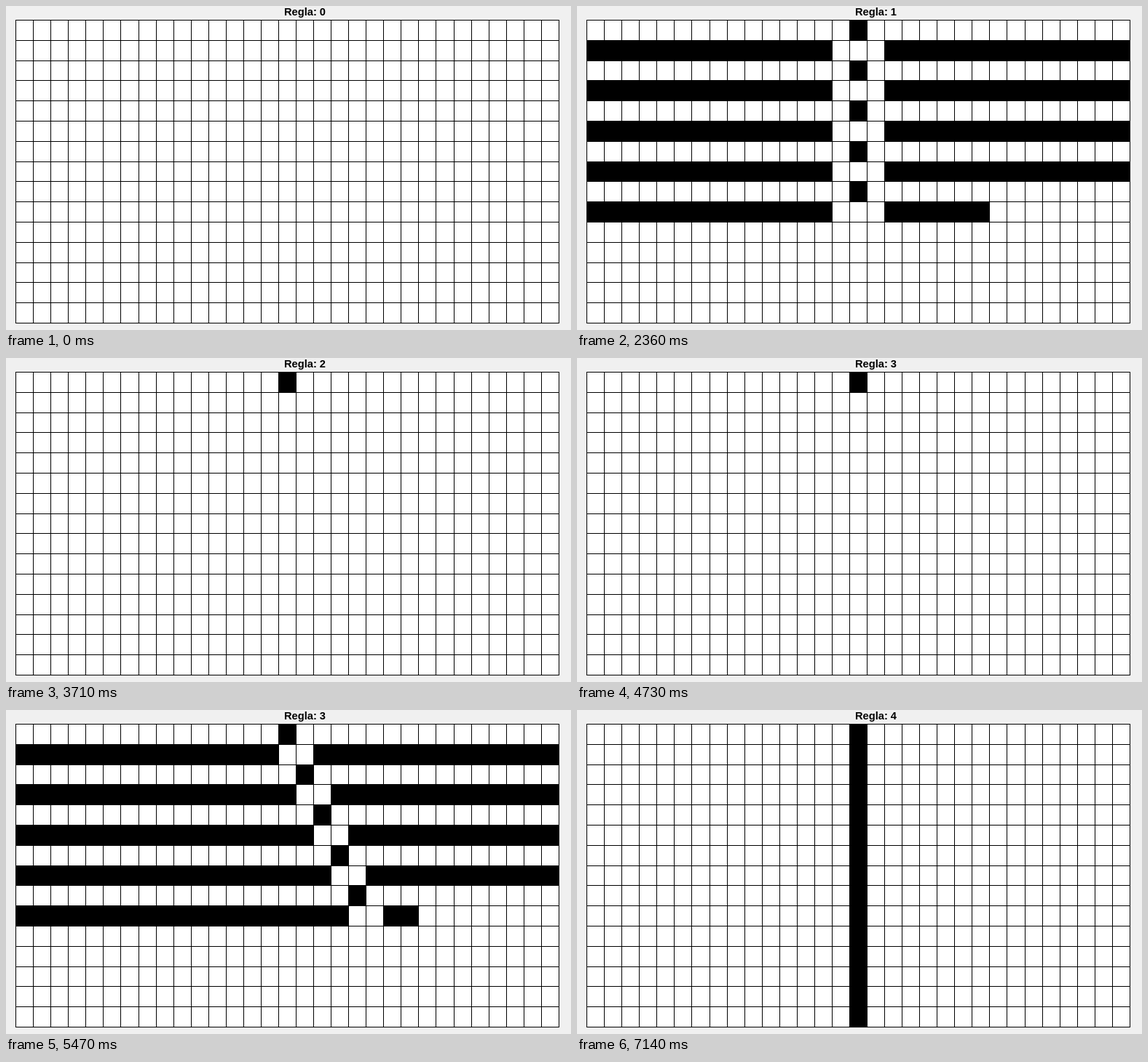
An HTML page with a canvas that plays this animation: 776x446 px, repeating every 8000 ms.

```html
<!DOCTYPE html>
<html lang="es">
<head>
<meta charset="utf-8">
<title>Regla</title>
<style>
html, body { margin: 0; width: 776px; height: 446px; overflow: hidden; background: #f0f0f0; }
canvas { position: absolute; left: 0; top: 0; }
#title {
  position: absolute; left: 382px; top: 0; white-space: pre;
  font: bold 14.67px/16px "Liberation Sans", Arial, sans-serif; color: #000;
}
</style>
</head>
<body>
<canvas id="stage" width="776" height="446"></canvas>
<div id="title"></div>
<script>
const COLS = 31, ROWS = 15, LOOP = 8000, TICK = 67;
const colX = c => Math.round(386 + 24.056 * (c - COLS / 2));
const rowY = r => Math.round(227.5 + 27.8 * (r - ROWS / 2));
const ctx = document.getElementById('stage').getContext('2d');
const title = document.getElementById('title');

// When each rule starts drawing and how long it takes.
const phases = [[720, 0], [1580, 1270], [3710, 140], [4730, 1270], [6880, 260]];

// Share of cells drawn after a share of the time.
const pace = [[0, 0], [0.158, 0.143], [0.264, 0.281], [0.58, 0.67], [1, 1]];

function eased(p) {
  const i = pace.findIndex(([x]) => x >= p);
  if (i < 1) return i < 0 ? 1 : 0;
  const [x0, y0] = pace[i - 1], [x1, y1] = pace[i];
  return y0 + (y1 - y0) * (p - x0) / (x1 - x0);
}

// Black cells of an elementary automaton, in drawing order.
function blackCells(rule) {
  const cells = [];
  let row = Array.from({ length: COLS }, (_, c) => +(c === COLS >> 1));
  for (let r = 0; r < ROWS; r++) {
    row.forEach((on, c) => on && cells.push([c, r]));
    row = row.map((v, c) => {
      const left = row[(c + COLS - 1) % COLS], right = row[(c + 1) % COLS];
      return rule >> (left * 4 + v * 2 + right) & 1;
    });
  }
  return cells;
}
const cells = phases.map((_, rule) => blackCells(rule));

function stateAt(t) {
  const rule = Math.max(0, phases.findLastIndex(([start]) => start <= t));
  const [start, length] = phases[rule];
  const age = t - start;
  if (age < 0) return { rule, count: 0 };
  const p = age >= length ? 1 : Math.floor(age / TICK) * TICK / length;
  return { rule, count: Math.round(1 + eased(p) * (cells[rule].length - 1)) };
}

function draw({ rule, count }) {
  const x = colX(0), y = rowY(0), w = colX(COLS) - x, h = rowY(ROWS) - y;
  ctx.fillStyle = '#f0f0f0';
  ctx.fillRect(0, 0, 776, 446);
  ctx.fillStyle = '#fff';
  ctx.fillRect(x, y, w, h);
  ctx.fillStyle = '#000';
  for (let c = 0; c <= COLS; c++) ctx.fillRect(colX(c), y, 1, h + 1);
  for (let r = 0; r <= ROWS; r++) ctx.fillRect(x, rowY(r), w + 1, 1);
  for (const [c, r] of cells[rule].slice(0, count)) {
    ctx.fillRect(colX(c), rowY(r), colX(c + 1) - colX(c) + 1, rowY(r + 1) - rowY(r) + 1);
  }
  title.textContent = 'Regla: ' + rule;
}

const begin = performance.now();
function tick() {
  draw(stateAt((performance.now() - begin) % LOOP));
  requestAnimationFrame(tick);
}
tick();
</script>
</body>
</html>
```
